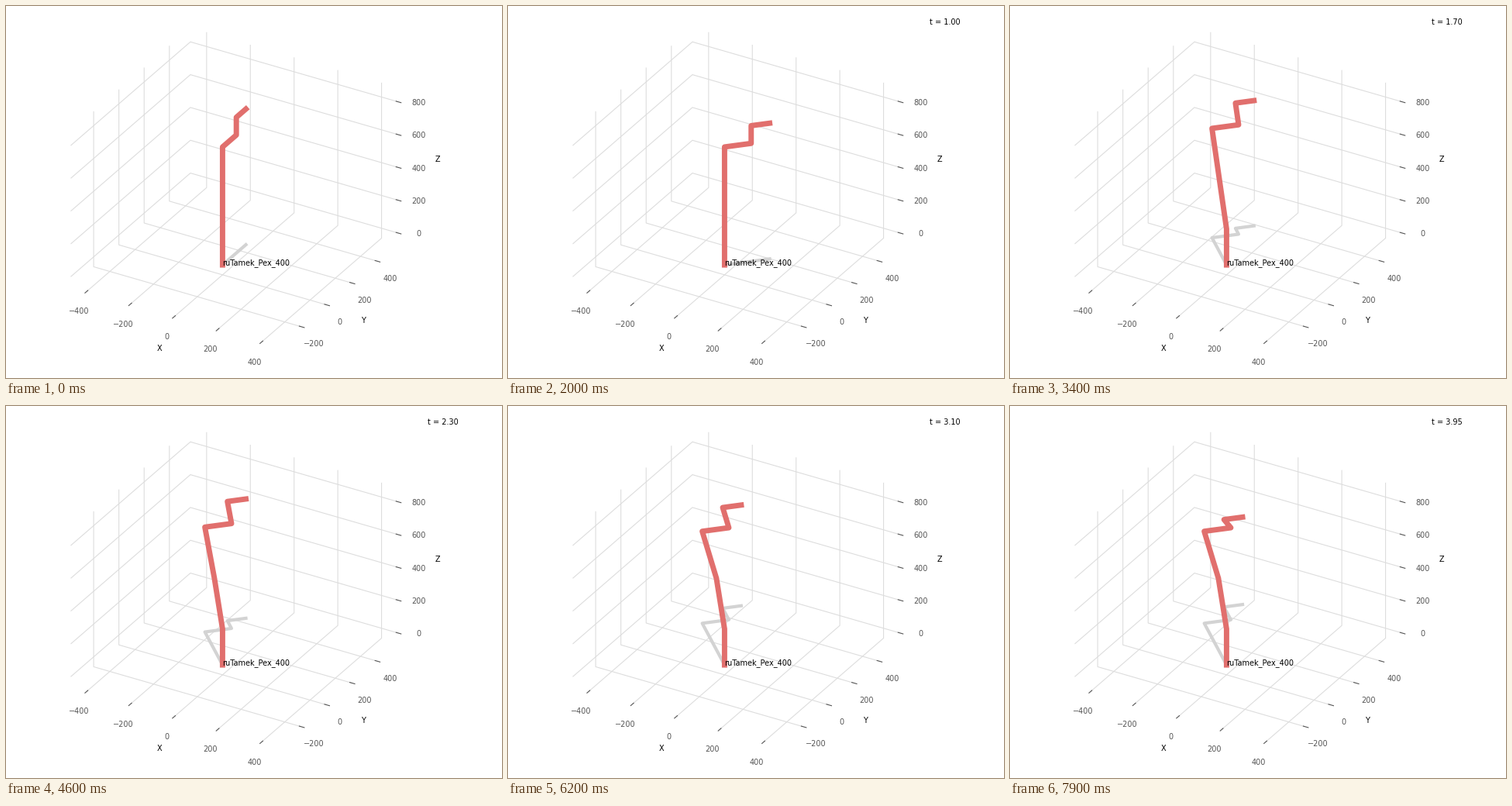
Recreate the animation shown at these times as a matplotlib script. Size 640 by 480 pixels, loop 8 s.

```python
import numpy as np
import matplotlib.pyplot as plt
from matplotlib.animation import FuncAnimation
from matplotlib.collections import LineCollection

plt.rcParams["font.family"] = "DejaVu Sans"
plt.rcParams["font.size"] = 7

W, H, DPI = 640, 480, 100
STEPS, DT = 20, 0.05
GRID, TICK, ARM, SHADOW = "#dddddd", "#555555", "#e16f6d", "lightgray"

# arm geometry in mm and the joint moves, made one after the other
BASE, UPPER, FORE = 219.34, 250, 250
SHOULDER, WRIST, TOOL = 109.1, 108, 75.86
MOVES = np.radians([45, 30, 30, 45])

# orthographic view: elevation 30, azimuth -60, box aspect 4:4:3
SPAN = (BASE + UPPER + FORE + WRIST) * 1.1
MID = np.array([0, (SHOULDER + TOOL) / 2, SPAN / 2.2])
LO, HI = MID - SPAN * 25 / 48, MID + SPAN * 25 / 48
UNIT = 480 / 1.85 / SPAN
SIZE = np.array([8 / 7, 8 / 7, 6 / 7]) * UNIT
C, S = np.cos(np.pi / 6), 0.5
VIEW = np.array([[C, S, 0], [S * S, -S * C, -C]]) * SIZE
CENTRE = np.array([288, 240]) + np.array([1, -1]) * 480 * (0.95 / 1.85 - 0.5)


def project(points):
    return (np.asarray(points, float) - MID) @ VIEW.T + CENTRE


def smooth(u):
    return u**3 * (10 - 15 * u + 6 * u * u)


def arm_points(i):
    seg, k = divmod(i, STEPS)
    done = np.clip(seg - np.arange(4), 0, 1).astype(float)
    done[seg] = smooth(k / (STEPS - 1))
    turn, *bends = MOVES * done
    side = np.array([np.sin(turn), np.cos(turn), 0])
    lean = np.array([-np.cos(turn), np.sin(turn), 0])
    a, b, c = (np.sin(t) * lean + np.array([0, 0, np.cos(t)])
               for t in np.cumsum(bends))
    links = [np.zeros(3), np.array([0, 0, BASE]), UPPER * a, FORE * b,
             SHOULDER * side, WRIST * c, TOOL * side]
    return np.cumsum(links, axis=0)


fig = plt.figure(figsize=(W / DPI, H / DPI), dpi=DPI, facecolor="white")
ax = fig.add_axes([0, 0, 1, 1])
ax.set(xlim=(0, W), ylim=(H, 0))
ax.axis("off")

STEP = SPAN / 12
PAD = 48 / 691.2 * STEP  # one point of label padding in mm
(x0, y0, z0), (x1, y1, z1) = LO, HI
EX, EY, EZ = np.eye(3)

# per axis: name, ticks, grid path, edge point, tick direction, label direction
axes = [
    ("X", range(-400, 401, 200),
     lambda v: [(v, y0, z0), (v, y1, z0), (v, y1, z1)],
     lambda v: (v, y0, z0), -EY, -EY - EZ),
    ("Y", range(-200, 401, 200),
     lambda v: [(x1, v, z0), (x0, v, z0), (x0, v, z1)],
     lambda v: (x1, v, z0), EX, EX - EZ),
    ("Z", range(0, 801, 200),
     lambda v: [(x0, y0, v), (x0, y1, v), (x1, y1, v)],
     lambda v: (x1, y1, v), EX, EX + EY),
]

for n, (name, ticks, path, edge, out, away) in enumerate(axes):
    ax.add_collection(LineCollection([project(path(v)) for v in ticks],
                                     colors=GRID, linewidths=0.8, zorder=1),
                      autolim=False)
    for v in ticks:
        p = np.array(edge(v))
        ends = project([p + 0.2 * STEP * out, p - 0.1 * STEP * out])
        ax.plot(*ends.T, color=TICK, lw=0.8, zorder=1.5)
        ax.text(*project(p + 11.5 * PAD * away), str(v).replace("-", "\u2212"),
                color=TICK, ha="center", va="top")
    ax.text(*project(np.array(edge(MID[n])) + 22 * PAD * away), name,
            color="black", ha="center", va="center")

shadow, = ax.plot([], [], color=SHADOW, lw=3, zorder=2)
arm, = ax.plot([], [], color=ARM, lw=5, zorder=2.1)
ax.text(*project([0, 0, 0]), "ruTamek_Pex_400", color="black")
clock = fig.text(0.85, 0.95, "", color="black")


def update(i):
    pts = arm_points(i)
    arm.set_data(*project(pts).T)
    shadow.set_data(*project(pts * [1, 1, 0]).T)
    clock.set_text(f"t = {i * DT:.2f}" if i else "")
    return shadow, arm, clock


anim = FuncAnimation(fig, update, frames=4 * STEPS, interval=100,
                     repeat=True, repeat_delay=0, blit=False)
plt.show()
```
